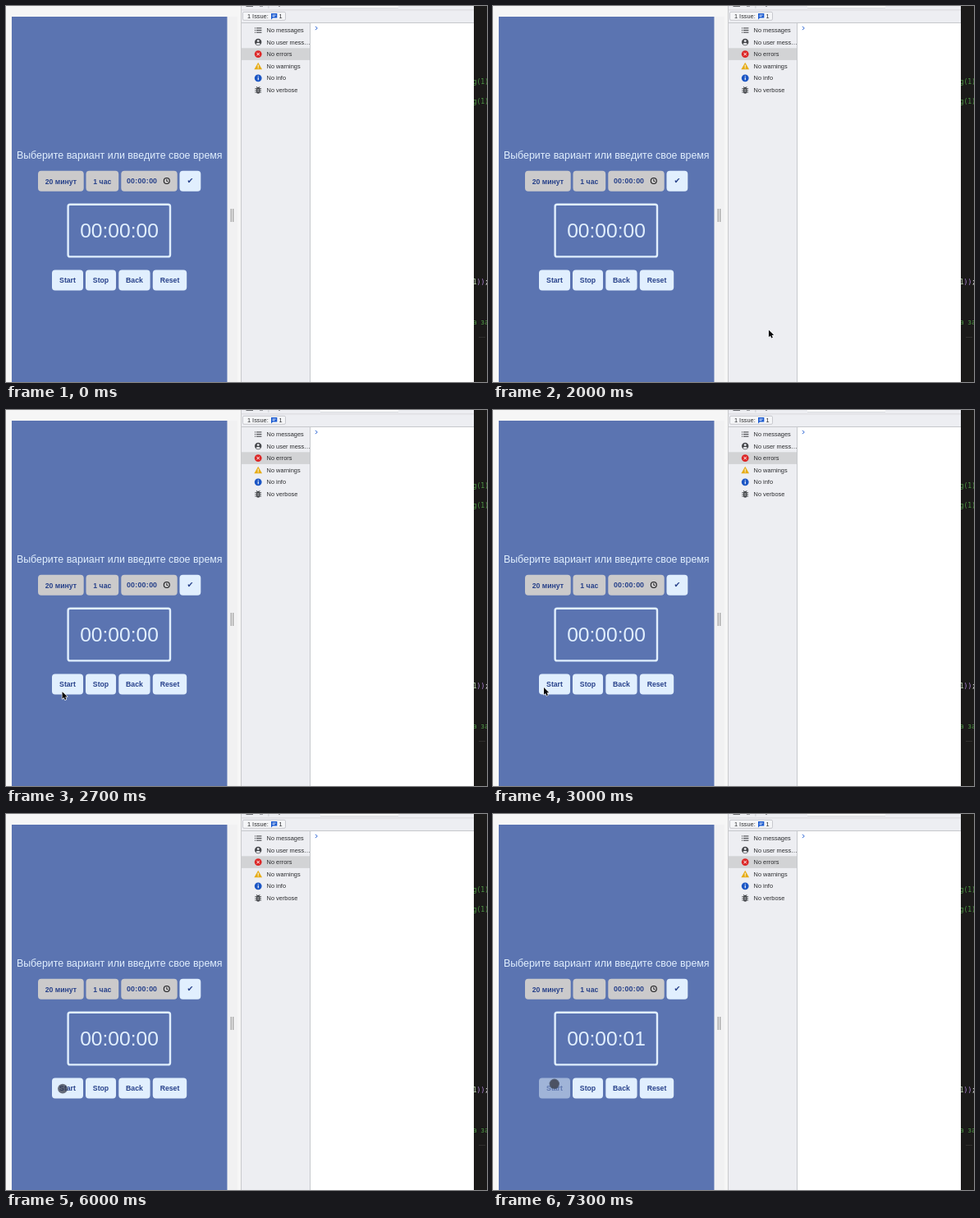
An HTML page with a canvas that plays this animation: 586x458 px, repeating every 8 s.

```html
<!DOCTYPE html>
<html lang="ru">
<head>
<meta charset="utf-8">
<title>Timer</title>
<style>
  html, body { margin: 0; width: 100%; height: 100%; overflow: hidden; background: #f6f6f6; }
  canvas { display: block; width: 586px; height: 458px; }
</style>
</head>
<body>
<canvas id="stage" width="586" height="458"></canvas>
<script>
const ctx = document.getElementById('stage').getContext('2d');
const LOOP = 8000;
const SANS = '"Liberation Sans", Arial, sans-serif';
const MONO = '"DejaVu Sans Mono", monospace';
const BLUE = '#5b74b1', PALE = '#e1effe', NAVY = '#27418a', GREY = '#cbcacb';
const ICON = '#46484c';

function rect(x, y, w, h, color) {
  ctx.fillStyle = color;
  ctx.fillRect(x, y, w, h);
}

function round(x, y, w, h, r) {
  ctx.beginPath();
  ctx.roundRect(x, y, w, h, r);
}

function dot(x, y, r, color) {
  ctx.fillStyle = color;
  ctx.beginPath();
  ctx.arc(x, y, r, 0, Math.PI * 2);
  ctx.fill();
}

function poly(points, color) {
  ctx.fillStyle = color;
  ctx.beginPath();
  points.forEach(([x, y]) => ctx.lineTo(x, y));
  ctx.closePath();
  ctx.fill();
}

function line(color, width, ...points) {
  ctx.strokeStyle = color;
  ctx.lineWidth = width;
  ctx.beginPath();
  points.forEach(([x, y], i) => i ? ctx.lineTo(x, y) : ctx.moveTo(x, y));
  ctx.stroke();
}

function text(str, x, y, size, color, { align = 'left', weight = '', family = SANS } = {}) {
  ctx.font = `${weight} ${size}px ${family}`;
  ctx.textAlign = align;
  ctx.fillStyle = color;
  ctx.fillText(str, x, y);
}

function button(x, y, w, label, fill) {
  ctx.fillStyle = fill;
  round(x, y, w, 25, 4);
  ctx.fill();
  text(label, x + w / 2, y + 15.8, 8.7, NAVY, { align: 'center', weight: 'bold' });
}

function timeField() {
  button(140.3, 200.7, 68.4, '', GREY);
  const bold = { weight: 'bold' };
  ['00', '00', '00'].forEach((part, i) => text(part, 147 + i * 13.6, 216.4, 8.8, NAVY, bold));
  [157.2, 170.8].forEach(x => text(':', x, 216.4, 8.8, NAVY, bold));
  ctx.strokeStyle = '#1d1d1f';
  ctx.lineWidth = 1.1;
  ctx.beginPath();
  ctx.arc(195.8, 213, 3.5, 0, Math.PI * 2);
  ctx.stroke();
  line('#1d1d1f', 0.9, [195.8, 210.8], [195.8, 213.3], [197.5, 213.9]);
}

function page(t) {
  rect(0, 0, 286, 458, '#f6f6f6');
  rect(270, 13, 12, 445, '#f1f1f2');
  rect(7, 13, 262.5, 445, BLUE);
  rect(273.7, 247, 1, 16, '#8b8b8b');
  rect(276.3, 247, 1, 16, '#8b8b8b');

  text('Выберите вариант или введите свое время', 138.2, 185.8, 12.42, PALE, { align: 'center' });
  button(39, 200.7, 55.7, '20 минут', GREY);
  button(97.5, 200.7, 39.7, '1 час', GREY);
  timeField();
  button(211.5, 200.7, 25.8, '', PALE);
  text('✔', 224.4, 216.4, 9.5, NAVY, { align: 'center', family: '"DejaVu Sans", sans-serif' });

  ctx.strokeStyle = PALE;
  ctx.lineWidth = 2.4;
  round(75.6, 241.8, 124.4, 63.6, 2.5);
  ctx.stroke();
  text(t < 7300 ? '00:00:00' : '00:00:01', 138, 282.3, 24.6, PALE, { align: 'center' });

  ctx.globalAlpha = t < 6300 ? 1 : t < 6400 ? 0.75 : 0.52;
  button(56, 321.5, 38, 'Start', PALE);
  ctx.globalAlpha = 1;
  button(97, 321.5, 37, 'Stop', PALE);
  button(137.3, 321.5, 38.3, 'Back', PALE);
  button(178.8, 321.5, 41.4, 'Reset', PALE);
}

function sideIcons() {
  for (let i = 0; i < 3; i++) {
    const y = 26.4 + i * 2.6;
    rect(303, y, 1.1, 1.1, ICON);
    rect(305, y, 6.4, 1.1, ICON);
  }

  dot(307.2, 44, 4.2, ICON);
  dot(307.2, 42.6, 1.4, '#edeef2');
  ctx.fillStyle = '#edeef2';
  ctx.beginPath();
  ctx.ellipse(307.2, 46.2, 2.5, 1.3, 0, 0, Math.PI * 2);
  ctx.fill();

  dot(307.2, 58.6, 4.4, '#dc2626');
  line('#fff', 1, [305.5, 56.9], [308.9, 60.3]);
  line('#fff', 1, [308.9, 56.9], [305.5, 60.3]);

  poly([[307.2, 68.8], [312, 77.2], [302.4, 77.2]], '#e6ac16');
  rect(306.7, 71.6, 1, 3, '#fff');
  rect(306.7, 75.2, 1, 1, '#fff');

  dot(307.2, 87.8, 4.4, '#1a55c4');
  rect(306.7, 85.2, 1.1, 1.1, '#fff');
  rect(306.7, 87, 1.1, 3.3, '#fff');

  ctx.fillStyle = ICON;
  round(305, 98.8, 4.4, 8, 2.2);
  ctx.fill();
  [100.6, 102.8, 105].forEach(y => line(ICON, 0.9, [303.3, y], [311.1, y]));
  line(ICON, 0.8, [305, 98], [306.2, 99.4]);
  line(ICON, 0.8, [309.4, 98], [308.2, 99.4]);
  rect(306.3, 101.5, 1.8, 0.8, '#edeef2');
  rect(306.3, 103.5, 1.8, 0.8, '#edeef2');
}

function devtools() {
  rect(286, 0, 284, 458, '#edeef2');
  rect(371, 21, 199, 437, '#fff');
  rect(286, 0, 1, 458, '#c9cacd');
  rect(287, 4.5, 283, 0.8, '#d3d4d8');
  rect(287, 20, 283, 1, '#c6c8cc');
  rect(370, 21, 1, 437, '#c6c8cc');

  rect(383, 0, 95, 2, '#fff');
  rect(383, 2, 95, 0.7, '#cfd0d4');
  rect(292.5, 0, 8.5, 1, '#6b6d71');
  rect(309, 0, 4, 0.8, '#85878b');
  rect(332, 0, 2, 0.9, '#85878b');
  rect(319.5, 0, 0.8, 3, '#c6c8cc');

  ctx.fillStyle = '#f5f6f8';
  ctx.strokeStyle = '#c3c5ca';
  ctx.lineWidth = 0.9;
  round(288.5, 7.3, 52, 10, 1.5);
  ctx.fill();
  ctx.stroke();
  text('1 Issue:', 294, 15, 7.35, '#2b2c2f');
  text('1', 332.5, 15, 7.35, '#2b2c2f');
  poly([[323, 9], [330.3, 9], [330.3, 14.6], [325, 14.6], [323, 16.4]], '#1a5ad0');
  rect(324.5, 10.6, 4.3, 0.8, '#fff');
  rect(324.5, 12.3, 3, 0.8, '#fff');

  rect(287, 51.3, 83, 14.6, '#d2d3d5');
  const rows = ['No messages', 'No user mess…', 'No errors', 'No warnings', 'No info', 'No verbose'];
  rows.forEach((label, i) => text(label, 317.6, 32 + i * 14.62, 7.4, '#2a2b2e'));
  sideIcons();
  line('#3a6fd8', 1, [376.9, 24.9], [379.3, 27], [376.9, 29.1]);
}

function editor() {
  ctx.save();
  ctx.beginPath();
  ctx.rect(570, 0, 16, 458);
  ctx.clip();
  rect(570, 0, 16, 458, '#1b1a19');
  const code = (str, x, y, color) => text(str, x, y, 8, color, { family: MONO });
  code('g(1);', 568.7, 94.6, '#4f9a45');
  code('g(1);', 568.7, 119.1, '#4f9a45');
  code('1', 568.8, 339, '#b5cea8');
  code('))', 573.6, 339, '#b98be0');
  code(';', 583, 339, '#e4e4e4');
  code('а за', 568.7, 388, '#4f9a45');
  rect(576, 403, 8, 0.8, '#363533');
  ctx.restore();
}

// time, x, y of the arrow tip
const path = [
  [700, 487, 427], [800, 391, 405], [900, 345.8, 395.3], [1900, 345.8, 395.3],
  [2800, 58.7, 340.7], [2900, 57.5, 337.5], [3000, 62, 338], [3300, 65.5, 337],
  [3500, 65.5, 337], [3700, 66.8, 336.8], [6000, 66.8, 336.8]
];

function tipAt(t) {
  const i = path.findIndex(p => p[0] > t);
  const [t0, x0, y0] = path[i - 1], [t1, x1, y1] = path[i];
  const u = (t - t0) / (t1 - t0);
  const s = t0 === 1900 ? u * u * (3 - 2 * u) : u;
  const sy = t0 === 1900 ? Math.pow(s, 1.32) : s;
  return [x0 + (x1 - x0) * s, y0 + (y1 - y0) * sy];
}

function arrow(x, y) {
  const shape = [[0, 0], [0, 8.7], [2, 6.9], [3.3, 9.9], [4.9, 9.2], [3.6, 6.3], [6.2, 6.2]];
  const pts = shape.map(([dx, dy]) => [x + dx, y + dy]);
  ctx.lineJoin = 'round';
  line('#f4f6fa', 1.4, ...pts, pts[0]);
  ctx.lineJoin = 'miter';
  poly(pts, '#08080a');
}

function pointer(t) {
  if (t < 700) return;
  if (t < 6000) {
    arrow(...tipAt(t));
  } else if (t < 6100) {
    dot(69, 334.6, 5.9, 'rgba(52,57,70,0.72)');
  } else {
    dot(74.8, 328.8, 6.2, 'rgba(58,66,84,0.72)');
    dot(74.8, 328.8, 5.2, 'rgba(72,78,92,0.75)');
  }
}

function draw(now) {
  const t = Math.floor((now % LOOP) / 100) * 100;
  page(t);
  devtools();
  editor();
  pointer(t);
}

const start = performance.now();
function tick() {
  draw(performance.now() - start);
  requestAnimationFrame(tick);
}
tick();
</script>
</body>
</html>
```
